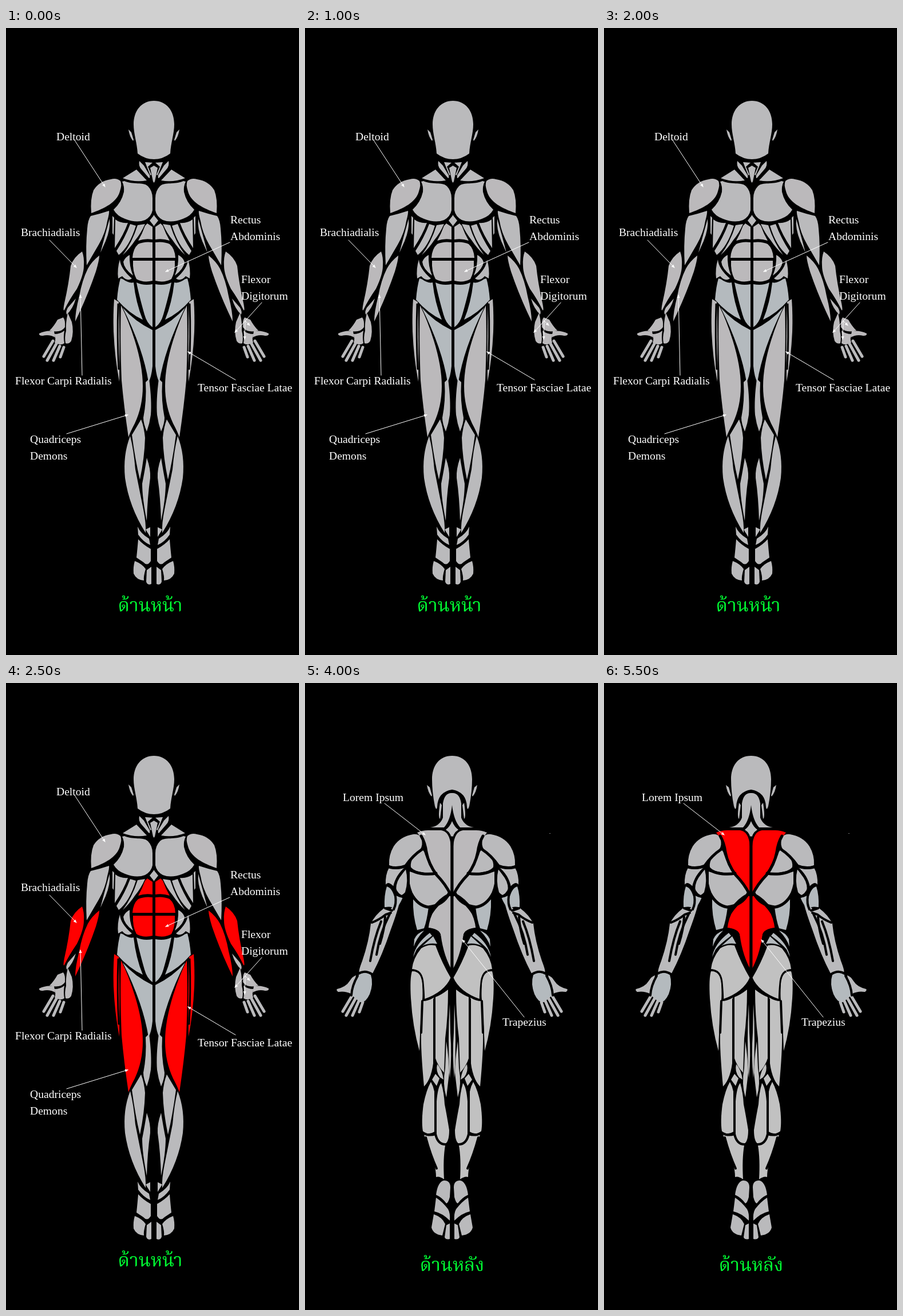
These frames come from a looping animation (512 by 1094 pixels, 6000 ms). An HTML page with a canvas:

```html
<!DOCTYPE html>
<html lang="th">
<head>
<meta charset="utf-8">
<title>Muscles</title>
<style>
html, body { margin: 0; width: 100%; height: 100%; overflow: hidden; background: #000; }
canvas { display: block; }
</style>
</head>
<body>
<canvas id="stage" width="512" height="1094"></canvas>
<script>
const ctx = document.getElementById('stage').getContext('2d');
const LOOP = 6000, BLINK = 500;
const GREY = '#bababc', LIGHT = '#c1c1c1', BLUE = '#b4babe', PINK = '#bbb9bb', RED = '#ff0000';

// Left halves of each body; every shape is mirrored about the view's axis.
const front = {
  axis: 258.5,
  tone: [
    [GREY, [
      'M259 127C236 127 223 145 223 168C223 185 229 200 230 219Q243 229 259 229Z',
      'M214 177L219 182L223 195L222 197Q216 190 214 177Z',
      // neck
      'M204 262L228 247L246 266Q225 270 204 262Z',
      'M233 232Q231 241 237 247L250 262Q252 262 251 257L241 240Z',
      'M243 234L256 235L248 242L254 256L252 257Z',
      'M259 240L252 244L257 268L259 270Z',
      // chest
      'M207 267C222 274 240 268 248 276Q256 284 256 297L256 318Q254 329 243 335Q228 341 208 333Q194 328 188 317Q202 304 206 286Q207 276 203 268Z',
      'M259 326L251 336L259 346Z',
      // upper arm
      'M180 319Q181 322 177 337Q174 357 162 378Q152 395 141 414Q139 380 142 350Q143 335 148 328Q165 324 180 319Z',
      'M181 333Q183 350 174 372L165 392Q172 365 181 333Z',
      'M186 328L189 331L188 361L186 358Z',
      // ribs and flank
      'M191 334Q200 341 213 340Q206 360 190 384Z',
      'M217 342L227 345Q216 381 197 396L193 389Q208 366 217 342Z',
      'M230 344L243 342Q236 358 226 370Q216 385 204 396Q220 375 230 344Z',
      'M199 404Q200 420 220 437Q212 443 203 433L196 437Q194 420 199 404Z',
      'M216 396Q215 415 222 432Q206 420 205 408Q208 400 216 396Z',
      // lower thigh, knee, calf
      'M244 618L250 612Q255 650 253 675Q251 690 246 704Q240 690 240 680Q246 650 244 618Z',
      'M217 712Q223 735 226 770Q232 800 240 840Q245 865 244 881Q215 835 208 785Q204 745 217 712Z',
      'M236 683Q241 695 243 715Q242 750 234 788Q226 755 220 710Q229 695 236 683Z',
      'M246 750Q253 770 252 785Q247 820 246 860Q238 820 238 795Q242 775 246 750Z',
      // foot
      'M230 870Q235 882 250 891L252 902Q240 897 231 884Z',
      'M244 875L252 871L252 888Z',
      'M231 892Q240 902 253 909L253 930Q247 940 240 932L228 924Q230 905 231 892Z',
      'M225 930Q238 935 244 944Q240 957 241 964Q228 963 223 952Q222 940 225 930Z',
      'M246 946L254 940L254 970Q247 973 245 966Z'
    ]],
    [PINK, [
      'M183 264Q193 261 200 267Q203 273 199 285C194 304 172 315 149 323Q147 298 153 283Q163 267 183 264Z',
      'M122 472Q117 490 106 500Q104 495 108 488Z',
      // hand
      'M100 505Q104 510 103 522Q96 533 76 528Q84 520 90 509Z',
      'M108 497L115 513Q119 530 114 546Q110 552 104 550Q102 540 105 528Q104 515 108 497Z',
      'M84 529Q70 527 58 533Q57 537 64 537Q76 534 86 540Z',
      'M84 534Q95 534 102 528Q100 540 102 550Q95 555 85 549Q88 541 84 534Z'
    ]],
    [BLUE, [
      'M256 447L256 522Q246 515 242 500Q232 465 228 444Q240 450 256 447Z',
      'M204 438Q215 446 223 444Q227 480 239 509Q215 498 194 474Q196 450 200 437Z',
      'M204 488Q225 512 256 527L256 590Q254 610 249 618Q240 560 204 488Z'
    ]]
  ],
  hot: [
    'M247 341L256 347L256 369Q243 367 231 371Q238 359 243 345Z',
    'M256 374L256 401L221 401Q222 385 231 377Q242 372 256 374Z',
    'M222 406L256 406L256 441Q240 445 228 438Q221 425 222 406Z',
    'M133 390Q137 400 136 415Q136 430 124 455Q110 475 102 492Q99 495 102 480Q110 445 113 415Q118 400 133 390Z',
    'M163 397Q163 405 157 425Q145 460 129 495L121 512Q121 495 128 468Q133 440 143 420Q150 407 163 397Z',
    'M189 473L197 478Q199 530 198 617Q190 575 188 530Q187 500 189 473Z',
    'M201 484Q214 510 225 545Q239 590 239 625Q239 660 225 690Q217 705 214 714Q206 660 202 615Q199 540 201 484Z'
  ],
  cuts: [[3, ['M196 482Q194 540 197 595']]],
  labels: [
    ['Deltoid', 88, 196], ['Brachiadialis', 26, 363], ['Rectus', 392, 341],
    ['Abdominis', 392, 370], ['Flexor', 411, 445], ['Digitorum', 411, 474],
    ['Flexor Carpi Radialis', 16, 622], ['Tensor Fasciae Latae', 335, 634],
    ['Quadriceps', 42, 724], ['Demons', 42, 753]
  ],
  arrows: [
    [120, 196, 173, 277], [76, 370, 123, 418], [391, 374, 279, 425], [447, 479, 400, 531],
    [418, 511, 417, 543], [418, 511, 426, 519], [133, 606, 130, 466],
    [401, 614, 318, 565], [106, 708, 213, 675]
  ],
  title: ['ด้านหน้า', 252, 1018]
};

const back = {
  axis: 257,
  tone: [
    [GREY, [
      'M257 127C234 127 222 145 222 168Q222 190 227 215Q230 224 231 216Q232 190 257 186Z',
      'M213 178L218 182L222 196L221 198Q215 191 213 178Z',
      // neck
      'M257 192Q244 191 241 210L241 235Q235 250 219 252L243 252Q254 240 257 213Z',
      'M236 209L239 213L236 237Q232 235 236 209Z',
      'M257 241Q253 251 246 256Q256 262 257 276Z',
      // shoulder and back
      'M189 264Q198 263 203 269Q207 283 201 291Q186 303 176 318Q160 324 147 318Q146 300 155 285Q166 268 189 264Z',
      'M204 290Q208 292 210 300Q218 322 227 331Q205 333 186 325Q183 318 187 308Q195 296 204 290Z',
      'M183 329Q205 337 230 334Q243 350 250 365Q240 385 215 390Q190 385 183 350Z',
      // upper arm
      'M147 322Q160 328 174 322Q176 323 172 328Q160 340 155 355Q145 345 141 352Q140 335 147 322Z',
      'M176 325Q181 345 175 365Q168 374 160 368Q157 352 165 340Z',
      // forearm
      'M138 393Q142 390 149 395L167 375Q163 395 150 430Q135 475 118 507Q105 502 95 505Q93 503 100 485Q112 450 115 420Q122 405 138 393Z',
      'M89 510Q88 525 80 542Q70 537 58 539Q54 536 56 534Q72 530 78 520Q83 512 89 510Z',
      // foot
      'M229 893Q232 870 243 868Q254 868 254 880L253 897Q250 908 247 908Q240 898 229 893Z',
      'M229 898Q240 905 250 918Q254 925 253 938Q240 925 226 922Z',
      'M225 927Q240 932 245 944L240 964Q224 962 221 950Z',
      'M247 946L253 943L253 970Q246 972 244 967Z'
    ]],
    [BLUE, [
      'M143 355Q148 348 158 370Q165 375 171 374Q165 388 158 395Q150 388 139 392Q138 370 143 355Z',
      'M94 509Q105 502 115 509Q120 525 113 543Q106 558 97 557Q86 550 81 543Q88 520 94 509Z',
      'M189 377Q200 390 216 391Q213 415 208 428L196 431Q188 405 189 377Z',
      'M191 447Q196 436 208 432Q195 445 190 460Z',
      'M189 478Q193 455 218 436L222 441Q203 455 195 465Z',
      'M224 442L231 455Q215 453 205 459Z'
    ]],
    [LIGHT, [
      'M228 458Q215 455 203 463Q189 480 187 499Q203 500 206 520Q208 540 209 552Q245 540 255 515Q240 490 228 458Z',
      'M187 503Q203 502 205 525Q206 545 205 553Q201 600 200 642Q188 600 185 550Q183 515 187 503Z',
      'M206 555Q215 555 225 549L225 655Q222 690 208 704Q202 640 203 610Z',
      'M228 548Q237 545 250 535Q250 580 245 620L243 680Q232 668 228 655Z',
      'M253 560Q249 620 253 690Q257 650 254 610Z',
      'M247 625Q252 660 252 680L247 723Q240 700 245 672Z',
      // knee and calf
      'M228 682L235 690L230 703L222 692Z',
      'M231 665Q240 675 242 692L236 688Q228 678 231 665Z',
      'M220 696Q228 710 228 735L226 783Q215 790 206 782Q203 765 207 735Q212 710 220 696Z',
      'M238 698Q243 715 244 735Q248 755 252 780Q252 800 245 804Q232 803 229 785L230 730Q232 705 238 698Z',
      'M208 788Q222 790 228 788Q232 803 245 807Q241 830 243 866Q235 860 229 862Q229 850 225 835Q214 810 208 788Z'
    ]]
  ],
  hot: [
    'M196 261Q205 257 215 257L238 257Q253 259 255 285L255 366Q245 350 230 335Q214 315 212 295Q209 275 196 261Z',
    'M255 369L255 498Q249 490 244 478Q236 455 234 438Q225 430 215 428Q215 410 228 395Q240 382 250 367Z'
  ],
  cuts: [
    [5, [
      // trapezius, shoulder blade and lat
      'M203 267Q210 279 212 295Q216 316 230 335Q245 350 255 370',
      'M252 367Q242 388 215 391Q197 388 186 368',
      'M252 369Q217 388 213 429Q234 431 235 441Q240 478 256 505',
      'M181 320Q187 331 207 333Q220 334 229 332',
      'M147 321Q162 325 176 319Q188 301 205 290',
      'M257 270L257 505'
    ]],
    [4, [
      // arm and wrist
      'M177 322Q160 336 156 356Q160 371 174 374', 'M143 353Q153 355 158 372Q160 385 155 395',
      'M140 393L152 397', 'M93 507Q105 500 117 508', 'M92 511Q82 528 81 545',
      'M117 418Q130 413 141 404L150 401', 'M133 416Q121 445 114 485',
      'M148 403Q131 436 125 474', 'M140 408Q139 430 131 455',
      // leg
      'M226 552L226 665', 'M205 555L203 610', 'M228 706L228 786',
      'M206 785Q216 791 228 787Q232 806 247 805', 'M211 793Q219 823 230 847'
    ]],
    [2.5, ['M187 501Q203 500 206 520Q208 540 208 553Q245 540 256 514']]
  ],
  labels: [['Lorem Ipsum', 66, 206], ['Trapezius', 345, 598]],
  arrows: [[139, 210, 210, 265], [383, 583, 275, 448]],
  title: ['ด้านหลัง', 257, 1026]
};

const fingers = ['M82 546L66 573', 'M88 551L72 580', 'M94 555L83 580', 'M101 557L95 574'];

for (const view of [front, back]) {
  const compile = list => list.map(d => new Path2D(d));
  const compileGroups = groups => groups.map(([style, list]) => [style, compile(list)]);
  view.tone = compileGroups(view.tone);
  view.cuts = compileGroups(view.cuts);
  view.hot = compile(view.hot);
  view.fingers = compile(fingers);
}

function fillAll(paths, color) {
  ctx.fillStyle = color;
  paths.forEach(p => ctx.fill(p));
}

function strokeAll(paths, color, width) {
  ctx.strokeStyle = color;
  ctx.lineWidth = width;
  paths.forEach(p => ctx.stroke(p));
}

function drawHalf(view, lit) {
  view.tone.forEach(([color, paths]) => fillAll(paths, color));
  fillAll(view.hot, lit ? RED : PINK);
  ctx.lineCap = 'round';
  strokeAll(view.fingers, GREY, 5);
  view.cuts.forEach(([width, paths]) => strokeAll(paths, '#000', width));
}

function drawArrow([x1, y1, x2, y2]) {
  ctx.lineWidth = 1;
  ctx.strokeStyle = ctx.fillStyle = '#fff';
  ctx.beginPath();
  ctx.moveTo(x1, y1);
  ctx.lineTo(x2, y2);
  ctx.stroke();
  ctx.save();
  ctx.translate(x2, y2);
  ctx.rotate(Math.atan2(y2 - y1, x2 - x1));
  ctx.beginPath();
  ctx.moveTo(1, 0);
  ctx.lineTo(-5, -2.5);
  ctx.lineTo(-5, 2.5);
  ctx.fill();
  ctx.restore();
}

function drawView(view, lit) {
  ctx.fillStyle = '#000';
  ctx.fillRect(0, 0, 512, 1094);
  drawHalf(view, lit);
  ctx.save();
  ctx.transform(-1, 0, 0, 1, 2 * view.axis, 0);
  drawHalf(view, lit);
  ctx.restore();

  view.arrows.forEach(drawArrow);
  ctx.fillStyle = '#fff';
  ctx.textAlign = 'left';
  ctx.font = '19.6px "Liberation Serif", serif';
  view.labels.forEach(label => ctx.fillText(...label));

  ctx.fillStyle = '#00ff33';
  ctx.textAlign = 'center';
  ctx.font = '300 32px "Noto Serif Thai", "Noto Serif", serif';
  ctx.fillText(...view.title);
  if (view === back) {
    ctx.fillStyle = '#777';
    ctx.fillRect(427, 262, 2, 1);
  }
}

function tick() {
  const t = performance.now() % LOOP;
  drawView(t < LOOP / 2 ? front : back, Math.floor(t / BLINK) % 2 === 1);
  requestAnimationFrame(tick);
}
tick();
</script>
</body>
</html>
```
